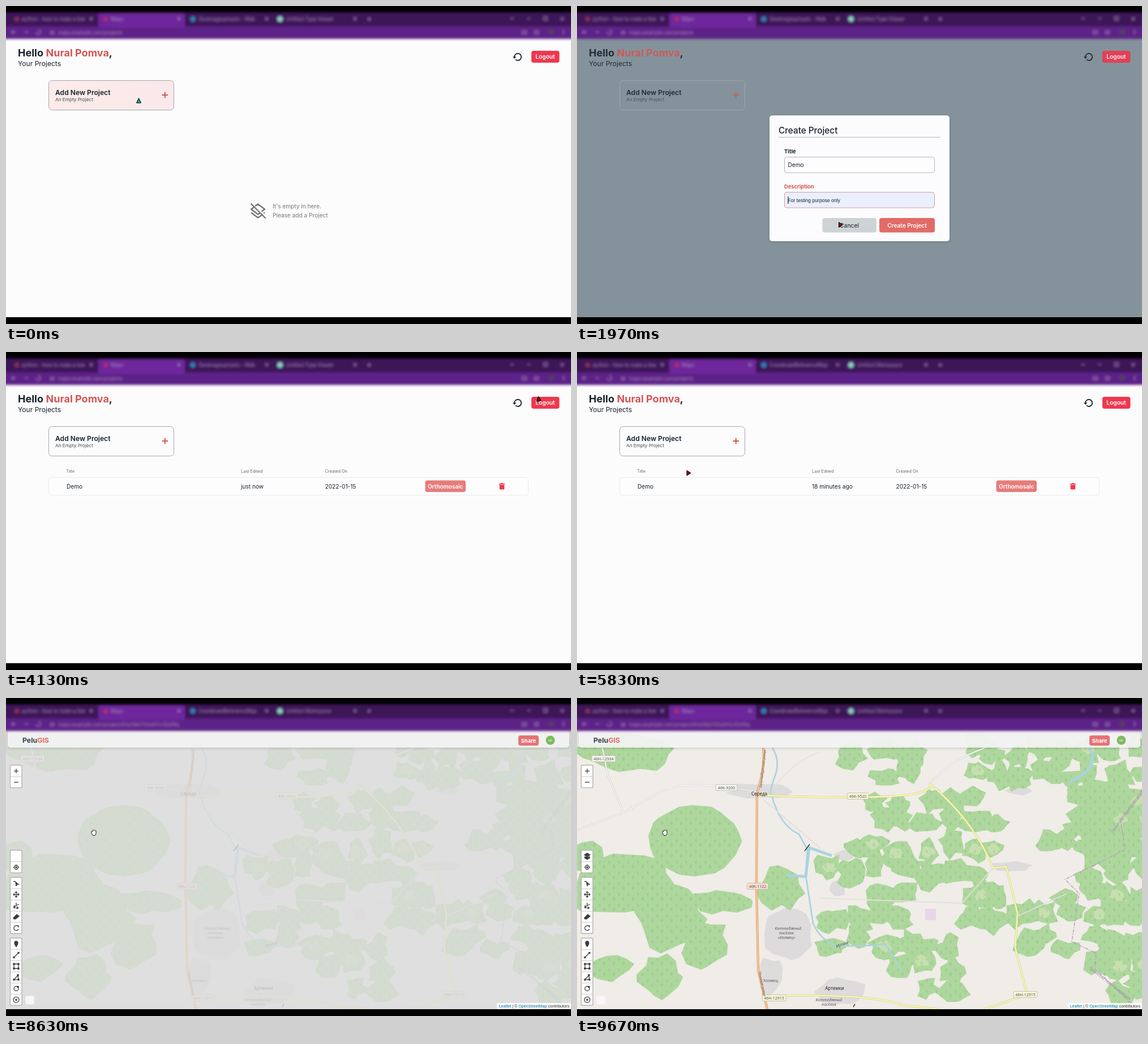
These frames come from a looping animation (998x561 px, 9710 ms). An HTML page:

```html
<!DOCTYPE html>
<html lang="en">
<head>
<meta charset="utf-8">
<title>Project dashboard</title>
<style>
  html, body { margin: 0; width: 100%; height: 100%; overflow: hidden; background: #000; }
  svg { display: block; font-family: Inter, sans-serif; fill: #16202b; }
  .b { font-weight: 600; }
  .h { font-weight: 700; }
  .mid { text-anchor: middle; }
  .white { fill: #fff; }
  .red { fill: #d25654; }
  .row { font-size: 10.15px; }
  .line { fill: none; stroke-linejoin: round; }
  .map text { font-family: "Noto Sans", sans-serif; text-anchor: middle; font-size: 7px; fill: #555; }
  .map .town { font-size: 8px; fill: #222; }
  .map .street { font-size: 6px; }
  .map .district { fill: #9a86a6; }
  .arial { font-family: "Liberation Sans", Arial, sans-serif; }
</style>
</head>
<body>
<svg width="998" height="561" viewBox="0 0 998 561">
  <defs>
    <linearGradient id="blush"><stop stop-color="#fcebe9"/><stop offset="1" stop-color="#f9e9eb"/></linearGradient>
    <pattern id="trees" width="17" height="19" patternUnits="userSpaceOnUse">
      <path d="M4 4q2-3 3 0t-3 0m2 1v3M12 13l2-4 2 4zm2 0v3" class="line" stroke="#6fa968" stroke-width=".8" opacity=".4"/>
    </pattern>
    <filter id="soft" x="-5%" y="-50%" width="110%" height="200%"><feGaussianBlur stdDeviation="2.2"/></filter>
    <filter id="shadow" x="-10%" y="-60%" width="120%" height="220%"><feDropShadow dx="0" dy="1" stdDeviation="2" flood-opacity=".22"/></filter>
  </defs>

  <rect y="50" width="998" height="499" fill="#fcfcfd"/>
  <rect id="dim" y="50" width="998" height="499" fill="#84939b"/>

  <g id="page">
    <text x="21" y="89" class="h" font-size="18">Hello <tspan x="70.5" class="red">Nural Pomva</tspan>,</text>
    <text x="21" y="105.5" font-size="12.1">Your Projects</text>
    <path d="M898 90a6.1 6.1 0 1 1 2 4.4" class="line" stroke="#16202b" stroke-width="1.8"/>
    <path d="M895 89.5h6.4l-3.2 3.5z"/>
    <rect x="928" y="79" width="49.5" height="21" rx="4" fill="#ee384f"/>
    <text x="952.5" y="93.3" class="b mid white" font-size="10.2">Logout</text>

    <rect id="card" x="75.5" y="131.5" width="221" height="52" rx="6" stroke="#a8a5ae"/>
    <text x="87" y="157" class="b" font-size="12.1">Add New Project</text>
    <text x="87" y="168" font-size="8.2" fill="#4a4a50">An Empty Project</text>
    <path d="M275.5 157h10.5m-5.25-5.25v10.5" stroke="#d25654" stroke-width="2"/>

    <g id="empty" fill="#757575" font-size="10.1">
      <path d="M432.5 348.5l26 26M440 353l5-3.5 12 9-5.5 4M438 355l-5 3.5 12 9 3-2M433 364.5l12 9 6.5-4.5M455 364.5l2 1" class="line" stroke="#757575" stroke-width="2.4"/>
      <text x="471" y="357">It's empty in here.</text>
      <text x="471" y="373">Please add a Project</text>
    </g>

    <g id="list">
      <g font-size="7.3" fill="#66666c">
        <text x="106" y="212.5">Title</text><text x="415" y="212.5">Last Edited</text><text x="563.5" y="212.5">Created On</text>
      </g>
      <rect id="row" x="75.5" y="221.5" width="847" height="31" rx="4"/>
      <g class="row">
        <text x="107" y="240.7">Demo</text><text id="edited" x="415" y="240.7"></text><text x="563.5" y="240.7">2022-01-15</text>
        <rect x="740.5" y="226.5" width="71.5" height="20.5" rx="4" fill="#e67c7a"/>
        <text x="776.2" y="240.5" class="b mid white" font-size="10">Orthomosaic</text>
      </g>
      <path d="M871 232h3l1-1h2l1 1h3v1.5h-10zM871.7 234.3h8.6v6.7q0 1.5-1.5 1.5h-5.6q-1.5 0-1.5-1.5z" fill="#ee384f"/>
    </g>
  </g>

  <g id="modal">
    <rect x="340" y="193" width="318" height="222" rx="5" fill="#fcfcfe" filter="url(#shadow)"/>
    <text x="356" y="225" font-size="15.3" font-weight="500">Create Project</text>
    <path d="M356 231.5h286" stroke="#b5b5bd"/>
    <text id="titleLabel" x="366" y="260" class="h" font-size="9.5">Title</text>
    <rect id="titleBox" x="366.5" y="266.5" width="265" height="27.5" rx="4"/>
    <text id="titleText" x="372.5" y="284" class="row"></text>
    <text id="descLabel" x="366" y="322" class="h" font-size="9.3">Description</text>
    <rect id="descBox" x="366.5" y="328.5" width="265" height="27.5" rx="4"/>
    <text id="preview" x="372.5" y="346" class="arial" font-size="8.6">For testing purpose only</text>
    <text id="descText" x="372.5" y="346" class="row">For testing purpose only</text>
    <path id="caret" stroke="#000"/>
    <rect x="433.5" y="374" width="95.5" height="25.5" rx="4" fill="#ced4d5"/>
    <text x="481" y="390.5" class="mid" font-size="10.4">Cancel</text>
    <rect x="534" y="374" width="98" height="25.5" rx="4" fill="#e26b67"/>
    <text x="583" y="390.5" class="b mid white" font-size="10.1">Create Project</text>
  </g>

  <g id="gis">
    <rect y="50" width="998" height="499" fill="#ddd"/>
    <g id="tiles" class="map">
      <rect y="50" width="998" height="499" fill="#f0ece8"/>
      <path id="builtUp" fill="#dddbdc"/>
      <path fill="#e8d6e8" d="M615 372h19v20h-19z"/>
      <path id="forest" fill="#aed79d"/>
      <path id="meadow" fill="#c6dfae"/>
      <path id="treeMarks" fill="url(#trees)"/>
      <g class="line" stroke="#a8d3df">
        <path d="M345 88Q360 110 349 140T344 172Q358 225 392 240L407 268 404 312 417 398Q435 435 465 437T545 434L572 478" stroke-width="2.6"/>
        <path d="M450 278L410 264 404 315 370 313M905 88Q925 125 870 148" stroke-width="5"/>
      </g>
      <path class="line" stroke="#b69fc0" stroke-width="1.4" stroke-dasharray="6 2 2 2" d="M998 162L960 215 968 268 862 320 887 345 874 430 917 450 915 478 990 549"/>
      <g id="roads" class="line"></g>
      <path d="M402 270L411 258M488 545l3-5" stroke="#333" stroke-width="1.5"/>
      <g id="shields"></g>
      <text x="322" y="172" class="town">Середа</text>
      <text x="455" y="514.5" class="town">Артемки</text>
      <text x="342" y="501">Холмец</text>
      <g font-style="italic">
        <text x="373" y="409">Коттеджный</text><text x="370" y="417">посёлок</text><text x="370" y="425">«Холмец»</text>
        <text x="445" y="535">Коттеджный</text><text x="445" y="543">посёлок</text>
        <text transform="translate(469 437) rotate(-18)">Мутня</text>
        <text transform="translate(974 202) rotate(-53)" class="district">Городской округ Шаховская</text>
        <text transform="translate(940 505) rotate(38)" class="district">Городской округ Шаховская</text>
      </g>
      <text transform="translate(330 125) rotate(-84)" class="street">Люксембургская улица</text>
      <text transform="translate(325 505) rotate(78)" class="street">Полевая улица</text>
    </g>
    <rect x="3" y="58" width="992" height="29.5" rx="5" fill="#f3f3f3" opacity=".93" filter="url(#shadow)"/>
    <text x="29" y="79" class="h" font-size="12.3" fill="#35434f">Pelu<tspan fill="#e26b67">GIS</tspan></text>
    <rect x="905" y="66" width="36" height="18" rx="4" fill="#e67274"/>
    <text x="923" y="78.5" class="h mid white" font-size="9.5">Share</text>
    <circle cx="961.5" cy="74.5" r="8" fill="#7dba5c"/>
    <text x="961.5" y="76.5" class="mid white" font-size="5">NP</text>
    <g id="tools"></g>
    <rect x="34.5" y="525.5" width="15.5" height="15" rx="3" fill="#f7f7f7"/>
    <rect x="867" y="538" width="131" height="11" fill="#fff" opacity=".8"/>
    <text x="995" y="545.5" class="arial" text-anchor="end" font-size="7.15" fill="#333"><tspan fill="#0078a8">Leaflet</tspan> | © <tspan fill="#0078a8">OpenStreetMap</tspan> contributors</text>
  </g>

  <rect width="998" height="11" fill="#000"/>
  <g filter="url(#soft)">
    <rect x="-10" y="11" width="1018" height="26" fill="#3e1459"/>
    <rect x="-10" y="36" width="1018" height="22" fill="#5d2087"/>
    <rect x="163" y="13" width="153" height="26" rx="4" fill="#6d279b"/>
    <circle cx="19" cy="23" r="4" fill="#8a3350"/><circle cx="176" cy="23" r="4" fill="#b52a68"/>
    <circle cx="330" cy="23" r="4.5" fill="#2385bd"/><circle cx="484" cy="23" r="5" fill="#8ccfc4"/>
    <g font-size="8.5" fill="#c3a6d3" opacity=".7">
      <text x="28" y="26">python - how to make a line</text><text x="185" y="26">Maps</text>
      <text id="tab3" x="340" y="26"></text><text id="tab4" x="495" y="26"></text>
      <text id="url" x="92" y="50"></text>
    </g>
    <g class="line" stroke="#b594c8" stroke-width="1.5" opacity=".7">
      <path id="closers"/>
      <path d="M638 23h7m-3.5-3.5v7M891 22h6M921 22h5M950 19h6v6h-6zM17 46h-7l3-3m-3 3l3 3M33 46h6M53 46a4 4 0 1 0 4-4M79 45h5v4h-5zM912 44h7v5h-7zM934 44h6v5h-6zM985 42v8"/>
    </g>
    <circle cx="963" cy="46" r="4" fill="#4b4a43"/>
  </g>
  <rect y="549" width="998" height="12" fill="#000"/>

  <g id="cursor" stroke="#000" stroke-linejoin="round">
    <path id="arrow" d="M-3.5-4.5L3.5 0-3.5 4.5Z" fill="#7c0a1b"/>
    <path id="pointer" d="M0-4.5L4 4H-4Z" fill="#0fa593"/>
    <path id="hand" d="M-4 0Q-5-3-2.5-1.5V-3.5Q-1-5.5 0-4Q1.5-5.5 2.5-3.5Q4.5-4 4-.5V1Q4 4 2 5H-1.5Q-3 3-4 0Z" fill="#fff" stroke-width=".9"/>
  </g>
</svg>
<script>
const LOOP = 9710;
const MODAL_OPEN = 400, MODAL_CLOSE = 2650, RELOAD = 4270, MAP_OPEN = 8400, TILES_IN = 8594;
const el = id => document.getElementById(id);
const show = (id, on) => { el(id).style.display = on ? "" : "none"; };
const set = (id, attr, value) => el(id).setAttribute(attr, value);
const ramp = (t, a, b) => Math.min(1, Math.max(0, (t - a) / (b - a)));
const ease = u => u * u * (3 - 2 * u);

let seed = 7;
const random = () => (seed = seed * 16807 % 2147483647) / 2147483647;

// Ragged closed outline around an ellipse
function patch(x, y, rx, ry, rough = .22) {
  const corners = 6 + Math.round(Math.sqrt(rx + ry));
  const points = Array.from({ length: corners }, (_, i) => {
    const angle = (i + random() * .6) / corners * 2 * Math.PI;
    const reach = 1.08 + rough * (random() * 2 - 1);
    return `${(x + rx * reach * Math.cos(angle)).toFixed(1)} ${(y + ry * reach * Math.sin(angle)).toFixed(1)}`;
  });
  return `M${points.join("L")}Z`;
}

// Large woods, then small groves on a jittered grid that avoids the open fields
const woods = [
  [85, 96, 78, 32], [80, 332, 92, 46], [22, 285, 28, 26], [255, 360, 50, 18], [165, 385, 58, 52],
  [225, 432, 38, 40], [148, 490, 34, 36], [60, 476, 34, 20], [358, 335, 36, 34], [940, 220, 62, 85]
];
const fields = [
  [450, 180, 50, 85], [640, 110, 45, 45], [800, 190, 50, 40], [800, 305, 72, 48], [635, 370, 52, 38],
  [470, 340, 48, 20], [735, 470, 45, 60], [850, 510, 60, 55], [490, 500, 80, 40]
];
const inField = (x, y) => fields.some(([cx, cy, rx, ry]) => ((x - cx) / rx) ** 2 + ((y - cy) / ry) ** 2 < 1.25);

let forest = patch(207, 252, 76, 58, .04) + woods.map(w => patch(...w)).join("");
let meadow = "";
const CELL = 42;
for (let gx = 450; gx < 998; gx += CELL) {
  for (let gy = 95; gy < 549; gy += CELL) {
    const x = gx + (random() - .5) * 24, y = gy + (random() - .5) * 24;
    if (inField(x, y)) continue;
    forest += patch(x, y, 16 + random() * 12, 13 + random() * 11, .35);
    if (random() < .2) meadow += patch(x, y, 11, 9, .3);
  }
}
set("forest", "d", forest);
set("meadow", "d", meadow);
set("treeMarks", "d", forest);
set("builtUp", "d", patch(372, 416, 40, 42, .1) + patch(342, 490, 18, 30) + patch(320, 164, 48, 12)
  + patch(473, 277, 22, 8) + patch(460, 337, 13, 13) + patch(768, 297, 34, 8) + patch(780, 164, 22, 7) + patch(465, 518, 38, 24));

const road = (d, casing, fill, width) =>
  `<path d="${d}" stroke="${casing}" stroke-width="${width + 1.2}"/><path d="${d}" stroke="${fill}" stroke-width="${width}"/>`;
el("roads").innerHTML =
  road("M0 233L85 201 155 162Q205 143 318 166M45 88L54 135 82 202M623 151Q655 112 720 88", "#c2bfc1", "#fff", 1.6) +
  road("M430 353L680 362 735 300M330 180L430 265M345 160Q385 110 430 95M778 385L865 345", "#e0dadb", "#eee9e9", .6) +
  road("M318 169Q345 175 490 175T623 151Q700 215 735 300L758 297 778 380 774 440 795 523 720 549M335 525H440Q540 528 575 542L640 549", "#cbcb98", "#f6f8a8", 2.4) +
  road("M329 88Q333 120 318 168L317 330 320 480 336 549", "#d39a62", "#fac08d", 3);

function shield(x, y, label, fill = "#f4f4f0") {
  const w = label.length * 4.2 + 4;
  return `<rect x="${x - w / 2}" y="${y - 5.5}" width="${w}" height="11" rx="1.5" fill="${fill}" stroke="#bbb9a0" stroke-width=".8"/>
    <text x="${x}" y="${y + 2.6}">${label}</text>`;
}
el("shields").innerHTML = shield(47, 107, "46H-12934") + shield(264, 158, "46K-9200")
  + shield(496, 173, "46K-9520", "#f7f6da") + shield(319, 332, "46K-1122", "#f9ddd2")
  + shield(348, 529, "46H-12915", "#f7f6da") + shield(792, 523, "46H-12915", "#f7f6da");

// Toolbar icons, drawn around their own centre; solid ones are filled
const knob = (x, y) => `M${x - 1} ${y - 1}h2v2h-2z`;
const ring = r => `M${-r} 0a${r} ${r} 0 1 0 ${2 * r} 0a${r} ${r} 0 1 0 ${-2 * r} 0`;
const solid = d => ({ d, fill: "#3c3c3c" });
const layersIcon = solid("M-5-2L0-5 5-2 0 1ZM-5 1L0 4 5 1M-5 3L0 6 5 3");
const toolGroups = [
  [119, ["M-4 0H4M0-4V4", "M-4 0H4"]],
  [269, [layersIcon, ring(3.5) + "M0-5v2M0 3v2M-5 0h2M3 0h2" + knob(0, 0)]],
  [317, ["M-5-3Q0-5 1 4M-1-2L4 2 1 2 0 5Z", "M-5 0H5M0-5V5M-2-3L0-5 2-3M-2 3L0 5 2 3M-3-2L-5 0-3 2M3-2L5 0 3 2",
    "M-5 1L5-2M0-5V1" + knob(-3, 3) + knob(2, 4), solid("M-5 2L1-4 5-1-1 4H-4Z"), "M3-3A4.3 4.3 0 1 0 4 2M1-4H4V-1"]],
  [424, [solid("M0 5Q-6-4 0-5Q6-4 0 5"), "M-4 4L4-4" + knob(-4, 4) + knob(4, -4),
    "M-4-4H4V4H-4Z" + knob(-4, -4) + knob(4, -4) + knob(-4, 4) + knob(4, 4),
    "M-4 4L3-4 4 4Z" + knob(-4, 4) + knob(3, -4) + knob(4, 4), ring(4) + knob(3, -3), ring(5) + knob(0, 0)]]
];
const STEP = 19.7;
el("tools").innerHTML = toolGroups.map(([top, icons]) =>
  `<rect x="7.5" y="${top - .5}" width="20.5" height="${icons.length * STEP + .5}" rx="2" fill="#fff" stroke="#b3b3b0" stroke-width="1.4"/>` +
  icons.map((icon, i) => {
    const y = top + STEP * (i + .5);
    const divider = i ? `<path d="M8 ${y - STEP / 2}h19.5" stroke="#ccc"/>` : "";
    const id = icon === layersIcon ? 'id="layers"' : "";
    return `${divider}<path ${id} d="${icon.d || icon}" transform="translate(18 ${y})" fill="${icon.fill || "none"}" stroke="#3c3c3c" stroke-width="1.3"/>`;
  }).join("")).join("");

set("closers", "d", [148, 303, 458, 614, 980].map(x => `M${x} 20l5 5m0-5l-5 5`).join(""));

// Each move: start, end, destination
const moves = [
  [600, 950, 430, 280], [1450, 1940, 466, 386], [2000, 2250, 582, 389], [2630, 3230, 740, 150], [3770, 4130, 942, 84],
  [4800, 5830, 197.5, 213.5], [5830, 6130, 175, 238], [6770, 7230, 143, 239], [7900, 8400, 155, 237.5]
];
const cursorAt = t => moves.reduce(([x, y], [from, to, nextX, nextY]) => {
  const u = ease(ramp(t, from, to));
  return [x + (nextX - x) * u, y + (nextY - y) * u];
}, [234.5, 167]);

function field(name, focused, fill) {
  set(name + "Label", "class", focused ? "h red" : "h");
  set(name + "Box", "stroke", focused ? "#df9a9c" : "#b8b1bf");
  set(name + "Box", "fill", fill);
}

function render(t) {
  const [x, y] = cursorAt(t);
  const open = ramp(t, MODAL_OPEN, MODAL_OPEN + 200) * (1 - ramp(t, MODAL_CLOSE, MODAL_CLOSE + 200));
  const inMap = t >= MAP_OPEN, created = t >= MODAL_CLOSE + 50, reloaded = t >= RELOAD;
  const inside = (left, top, right, bottom) => x > left && x < right && y > top && y < bottom;

  set("dim", "opacity", open);
  set("page", "opacity", 1 - .1 * open);
  set("modal", "opacity", open);
  show("modal", open > 0);
  show("empty", !created);
  show("list", created);

  const onCard = !open && inside(75, 131, 297, 184), onRow = created && inside(75, 221, 923, 253);
  set("card", "fill", onCard ? "url(#blush)" : "none");
  set("row", "fill", onRow ? "#fbf2f1" : "#fdfdfe");
  set("row", "stroke", onRow ? "#ecdfe2" : "#ebe9ee");
  el("edited").textContent = reloaded ? "18 minutes ago" : "just now";

  const typed = "Demo".slice(0, Math.floor(ramp(t, 1000, 1400) * 4));
  const onDesc = t >= 1500, accepted = t >= 2050, previewing = t >= 1750 && !accepted;
  el("titleText").textContent = typed;
  field("title", t > 700 && !onDesc, "#fdfdfd");
  field("desc", onDesc, previewing || accepted ? "#e9effc" : "#fdfdfd");
  show("preview", previewing);
  show("descText", accepted);
  show("caret", t > 700 && t % 1000 > 480 || !onDesc && typed);
  const caretX = 373 + (onDesc ? accepted * 114 : typed.length * 7);
  set("caret", "d", `M${caretX} ${onDesc ? 336 : 274}v13`);

  show("gis", inMap);
  set("tiles", "opacity", ramp(t, TILES_IN, TILES_IN + 200));
  show("layers", t > TILES_IN + 100);

  el("tab3").textContent = reloaded ? "CoordinateReferenceMap" : "Geoimageuploads - Web";
  el("tab4").textContent = reloaded ? "Untitled Workspace" : "Untitled Type Viewer";
  el("url").textContent = inMap ? "maps.example.com/project/61e29b0743a5f0c92d18a" : "maps.example.com/projects";

  const pointing = onCard || onRow;
  show("hand", inMap);
  show("pointer", pointing && !inMap);
  show("arrow", !pointing && !inMap);
  set("cursor", "transform", `translate(${x} ${y}) rotate(${inside(928, 79, 978, 100) ? 20 : 0})`);
}

const start = performance.now();
function tick() {
  render((performance.now() - start) % LOOP);
  requestAnimationFrame(tick);
}
tick();
</script>
</body>
</html>
```
